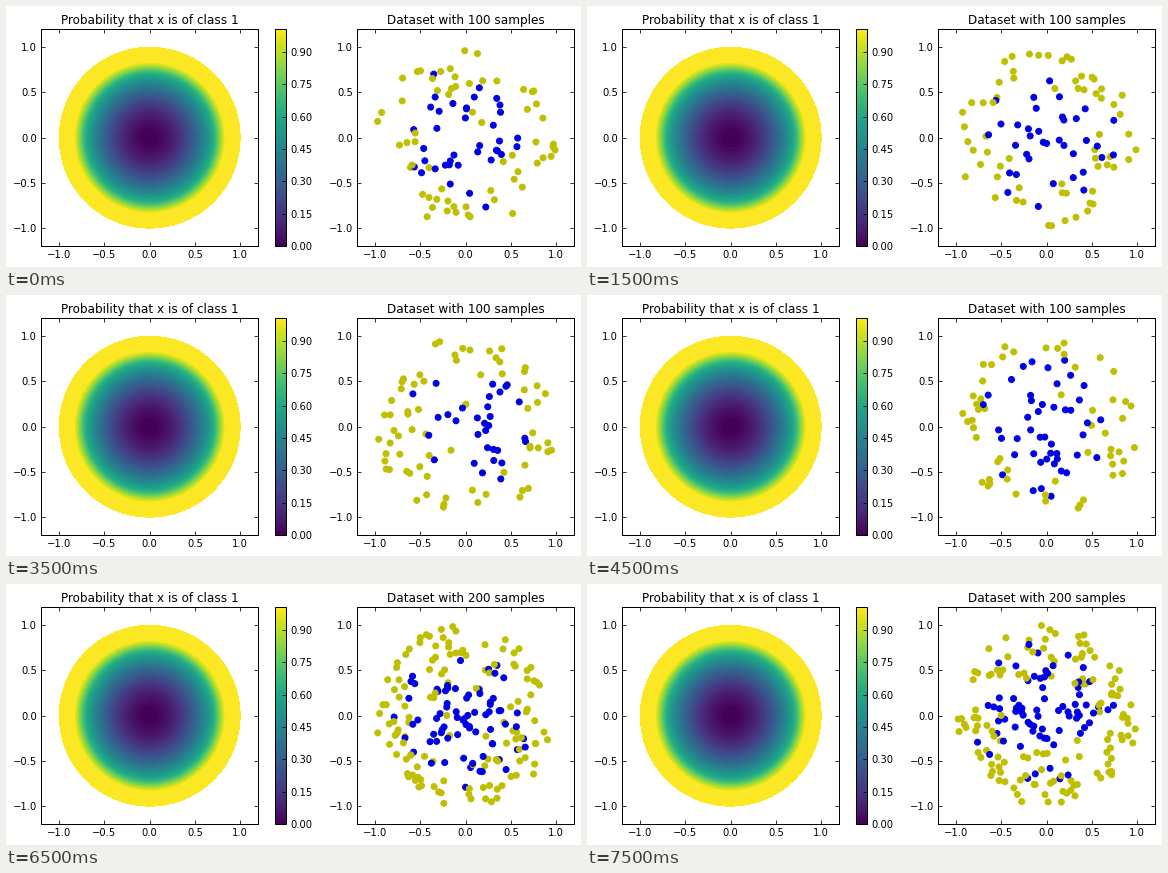
These frames come from a looping animation (575 by 261 pixels, 8000 ms). A matplotlib script:

```python
import numpy as np
import matplotlib.pyplot as plt
from matplotlib.animation import FuncAnimation

W, H, DPI = 575, 261, 72
FRAMES, INTERVAL = 16, 500
BOTTOM, SIDE = 20.8, 217
BLUE, YELLOW = "#0000e6", "#bfbf00"

plt.rcParams.update({
    "font.family": "DejaVu Sans", "font.size": 10,
    "axes.titlesize": 12, "axes.titlepad": 5, "axes.linewidth": 1,
    "xtick.direction": "in", "ytick.direction": "in",
    "xtick.top": True, "ytick.right": True,
    "xtick.major.size": 4, "ytick.major.size": 4,
    "xtick.major.width": 0.8, "ytick.major.width": 0.8,
    "xtick.major.pad": 4, "ytick.major.pad": 4,
})


def prob(r):
    """Chance of class 1 at radius r: quadratic, then a steep rise to 1."""
    return np.clip(np.maximum((r / 0.9) ** 2, 0.64 + 3 * (r - 0.72)), 0, 1)


def sample(n, seed):
    """Uniform points on the unit disc with randomly drawn labels."""
    rng = np.random.default_rng(seed)
    r = np.sqrt(rng.random(n))
    a = 2 * np.pi * rng.random(n)
    label = rng.random(n) < prob(r)
    return np.column_stack([r * np.cos(a), r * np.sin(a)]), label


def add_axes(x, width):
    return fig.add_axes([x / W, BOTTOM / H, width / W, SIDE / H])


def add_panel(x, title):
    ax = add_axes(x, SIDE)
    ticks = np.arange(-1, 1.1, 0.5)
    ax.set(xlim=(-1.2, 1.2), ylim=(-1.2, 1.2), xticks=ticks, yticks=ticks)
    ax.set_title(title)
    return ax


fig = plt.figure(figsize=(W / DPI, H / DPI), dpi=DPI, facecolor="white")

# Probability map
left = add_panel(35.2, "Probability that x is of class 1")
r, a = np.meshgrid(np.linspace(0, 1, 201), np.linspace(0, 2 * np.pi, 181))
levels = np.linspace(0, 1.005, 68)
disc = left.contourf(r * np.cos(a), r * np.sin(a), prob(r), levels,
                     cmap="viridis")

bar = fig.colorbar(disc, cax=add_axes(269.2, SIDE / 20),
                   ticks=np.arange(0, 0.91, 0.15), format="%.2f")
bar.minorticks_off()
bar.ax.tick_params(direction="in", left=False, right=True)

# Samples
right = add_panel(351.2, "Dataset with 100 samples")
dots = right.scatter([], [], s=36, linewidths=1)


def update(i):
    n = 100 if i < 10 else 200
    xy, label = sample(n, 40 + i)
    colors = np.where(label, YELLOW, BLUE)
    dots.set_offsets(xy)
    dots.set_facecolor(colors)
    dots.set_edgecolor(colors)
    right.set_title(f"Dataset with {n} samples")
    return dots, right.title


anim = FuncAnimation(fig, update, frames=FRAMES, interval=INTERVAL,
                     init_func=lambda: update(0), repeat=True,
                     repeat_delay=0, blit=False)
plt.show()
```
